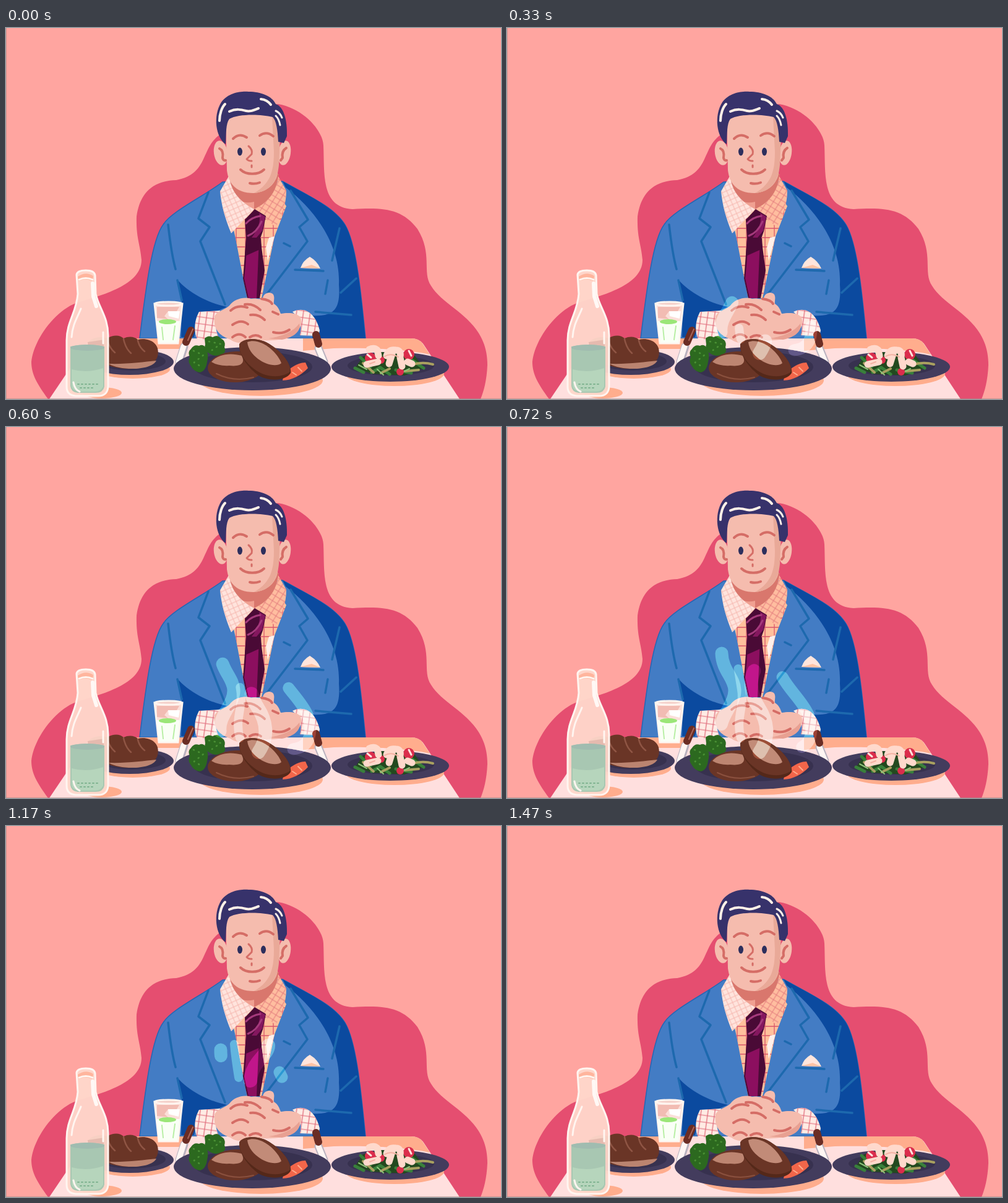
These frames come from a looping animation (800x600 px, 1500 ms). An HTML page:

```html
<!DOCTYPE html>
<html lang="en">
<head>
<meta charset="utf-8">
<title>Dinner</title>
<style>
html, body { margin: 0; width: 100%; height: 100%; overflow: hidden; background: #ffa5a0 }
svg { display: block; width: 800px; height: 600px }
.line { fill: none; stroke-linecap: round; stroke-linejoin: round }
.seam { stroke: #1d69ae; stroke-width: 3.5 }
.crease { stroke: #d56d66; stroke-width: 4 }
.shine { stroke: #fff1e8; stroke-width: 4 }
.glass { stroke: #fff5f0; stroke-width: 3 }
.skin { fill: #f5bcae }
.dark { fill: #0b4a9f }
.plate { fill: #433c5d }
.well { fill: #37314f }
.shadow { fill: #ffad8d }
.meat { fill: #6a3526 }
.steam { stroke: #fff; opacity: .46; mix-blend-mode: overlay }
</style>
</head>
<body>
<svg viewBox="0 0 800 600">
  <defs>
    <pattern id="check" width="15" height="15" patternUnits="userSpaceOnUse" x="371" y="338">
      <path d="M0 1H15M1 0V15" stroke="#d9566a" stroke-width="1.3"/>
    </pattern>
    <pattern id="fineL" width="8" height="8" patternUnits="userSpaceOnUse" patternTransform="rotate(-24)">
      <path d="M0 1H8M1 0V8" stroke="#f5b5ad" stroke-width="1"/>
    </pattern>
    <pattern id="fineR" width="9" height="9" patternUnits="userSpaceOnUse" patternTransform="rotate(32)">
      <path d="M0 1H9M1 0V9" stroke="#e27a7c" stroke-width="1"/>
    </pattern>
    <pattern id="cuff" width="11" height="11" patternUnits="userSpaceOnUse" patternTransform="rotate(8)">
      <path d="M0 1H11M1 0V11" stroke="#de6272" stroke-width="1.2"/>
    </pattern>
  </defs>

  <rect width="800" height="600" fill="#ffa5a0"/>
  <path fill="#e54e70" d="M400 130L440 123C480 130 512 165 513 190C515 235 508 290 560 293C610 290 640 292 665 325C690 365 672 395 687 417C710 455 778 470 778 545C777 570 772 588 767 600H68C50 575 41 560 41 540C44 506 78 458 113 445C155 432 219 416 219 375C217 350 210 340 211 305C218 255 250 247 275 246C328 236 314 195 345 173Z"/>

  <!-- jacket -->
  <path fill="#437cc4" stroke="#2467b5" stroke-width="1.5" d="M350 249C320 272 268 296 254 318C236 342 226 420 216 502H581C574 430 567 358 551 324C536 292 490 272 447 248Z"/>
  <path class="dark" d="M447 248C490 272 536 292 551 324C567 358 574 430 581 502H495V465C530 467 541 455 538 415C541 350 498 292 452 258Z"/>
  <path class="dark" d="M277 407C295 428 325 444 357 451L338 459L312 461L304 500H283L284 440Z"/>

  <!-- shirt -->
  <path fill="#ffc09c" d="M362 300L371 340L384 408L390 437H413L434 337L453 288L440 270Z"/>
  <path fill="url(#check)" d="M362 300L371 340L384 408L390 437H413L434 337L453 288L440 270Z"/>
  <path fill="#fff0ea" d="M425 339L434 337L423 377L420 355Z"/>
  <path fill="#d9776d" d="M358 236H441L433 275L401 294L369 272Z"/>
  <path fill="#f0a091" d="M360 255C370 280 385 285 401 281L401 294L372 282Z"/>
  <path fill="#ffe4dd" d="M361 238C362 262 376 280 401 293L364 332C353 306 348 285 346 264Z"/>
  <path fill="url(#fineL)" d="M361 238C362 262 376 280 401 293L364 332C353 306 348 285 346 264Z"/>
  <path fill="#ffbd9f" d="M440 240C437 265 424 282 401 293L436 322C446 303 453 285 453 263Z"/>
  <path fill="url(#fineR)" d="M440 240C437 265 424 282 401 293L436 322C446 303 453 285 453 263Z"/>

  <!-- tie -->
  <path fill="#4a0a36" d="M402 293L420 304L415 329L411 340L418 392L410 437H390L383 405L388 340L386 310Z"/>
  <path fill="#8c0f5f" d="M389 342L409 341L407 390L405 437H392L385 405C388 380 389 360 389 342Z"/>
  <path fill="#4a0a36" d="M388 340L412 340L413 357L386 369Z"/>
  <path fill="#85175f" d="M409 299L419 305L414 328L405 339H397C408 325 412 312 409 299Z"/>
  <path class="line" stroke="#a53a7c" stroke-width="3" d="M388 316C395 308 404 305 411 304M391 336C402 332 409 322 413 313"/>

  <!-- jacket seams -->
  <g class="line seam">
    <path d="M327 266L311 308L329 322L314 345L354 447M460 263L488 310L474 322L487 345L418 435"/>
    <path d="M262 318C265 345 268 368 274 390M277 408L284 440M539 324L527 376M566 405L541 428M520 408L516 430M500 459L558 464M467 391L513 393M449 348L459 353"/>
  </g>
  <path fill="#ffe5dc" d="M476 388Q480 376 491 370Q503 377 508 389Z"/>
  <path fill="#ffc3a5" d="M476 388L494 383L508 389Z"/>

  <!-- head -->
  <ellipse class="skin" cx="347" cy="202" rx="11" ry="20" transform="rotate(-8 347 202)"/>
  <ellipse class="skin" cx="450" cy="202" rx="10" ry="20" transform="rotate(8 450 202)"/>
  <path class="skin" d="M355 140L357 230C360 255 375 267 400 267C425 265 436 250 439 235L445 140Z"/>
  <path fill="#e9a998" d="M430 143L444 150L441 222C438 250 425 265 401 267C426 252 433 235 433 200Z"/>
  <path class="line crease" d="M345 195Q352 198 350 210Q351 215 355 214M453 194Q445 199 447 210L444 214"/>
  <path fill="#37326b" d="M355 188C339 177 334 142 348 120C360 104 380 102 392 103C412 103 430 110 436 123C449 127 455 150 454 175L449 186L440 184C439 165 437 150 431 144C410 139 375 139 361 147C355 155 356 170 355 188Z"/>
  <g class="line shine">
    <path d="M361 135C372 130 380 132 388 134S402 132 408 130M412 115Q422 116 428 124M345 150C345 139 349 128 354 123"/>
    <path stroke-width="3" d="M436 134Q443 137 446 145M436 142Q441 147 443 157"/>
  </g>
  <g fill="#2d2f5d">
    <ellipse cx="378" cy="200" rx="4" ry="6.5"/>
    <ellipse cx="416" cy="200" rx="4" ry="6.5"/>
  </g>
  <g class="line crease">
    <path d="M367 179Q377 169 389 177M410 174Q421 166 432 175M379 229C388 238 408 238 417 229M394 251Q402 253 410 250"/>
    <path stroke-width="3" d="M392 191Q399 197 397 204L389 212Q391 215 397 215M397 222V225"/>
  </g>

  <!-- table -->
  <path fill="#ffdfde" d="M70 600L124 520Q133 502 155 502H655Q668 502 675 512L733 600Z"/>
  <path class="shadow" d="M480 502H655Q669 502 675 513L685 528C650 520 590 517 530 518L480 522ZM155 502H300L292 519H240L140 516Z"/>
  <ellipse class="shadow" cx="205" cy="552" rx="60" ry="15"/>
  <ellipse class="shadow" cx="412" cy="570" rx="100" ry="25"/>
  <ellipse class="shadow" cx="628" cy="559" rx="80" ry="20"/>
  <ellipse class="shadow" cx="155" cy="590" rx="32" ry="9"/>

  <!-- cuffs and hands -->
  <g fill="#ffebe4">
    <path d="M312 459L346 457C337 474 337 490 346 504L309 503C302 487 306 470 312 459Z"/>
    <path d="M463 459C485 449 501 464 507 489L505 498L475 497C480 480 473 468 463 459Z"/>
  </g>
  <path fill="url(#cuff)" d="M312 459L346 457C337 474 337 490 346 504L309 503C302 487 306 470 312 459ZM463 459C485 449 501 464 507 489L505 498L475 497C480 480 473 468 463 459Z"/>
  <path class="skin" d="M337 466C342 457 354 456 361 449C368 439 384 434 396 438C404 436 410 440 415 437C416 429 426 425 432 431C435 437 432 441 433 446C440 450 442 457 444 462C455 460 470 460 476 468C480 480 473 490 464 497C445 506 425 506 410 505C388 511 371 511 363 504C346 498 334 488 337 466Z"/>
  <path fill="#e8a092" d="M424 502C442 500 464 492 474 478C477 490 466 500 446 504Z"/>
  <g class="line crease">
    <path d="M363 457Q374 447 390 452M386 447Q400 445 411 456M413 438Q427 440 430 446M395 464Q408 462 418 472M366 480Q380 470 391 479M366 500Q377 491 387 500M394 500Q404 494 412 500M431 459L440 463"/>
    <path d="M432 492Q446 496 458 488"/>
  </g>

  <!-- bread -->
  <ellipse class="plate" cx="200" cy="540" rx="71" ry="21"/>
  <ellipse class="well" cx="203" cy="539" rx="55" ry="15"/>
  <path class="meat" d="M133 508C140 500 155 498 163 502C175 495 185 497 190 502C198 498 208 499 213 504C225 501 241 505 245 518C248 531 243 542 225 548C205 553 180 552 164 545L133 540Z"/>
  <path fill="#bb8470" d="M166 543C195 544 222 540 243 538C235 554 186 555 166 543Z"/>
  <path class="line" stroke="#8f5544" stroke-width="2.5" d="M164 504Q166 516 176 525M190 503Q193 518 202 526M213 505Q215 516 224 523"/>

  <!-- glass -->
  <path fill="#fbdfd9" class="glass" d="M240 446L247 510H278L285 446Z"/>
  <ellipse fill="#f5cfc8" class="glass" cx="262.5" cy="446" rx="22" ry="3"/>
  <path fill="#fafff6" d="M243 474L248 509H277L281 474Z"/>
  <path fill="#f2bcb3" d="M244 451H280L276 458H262L256 466L262 471L244 469Z"/>
  <path fill="#fff" d="M262 458H281L279 470L263 466Z"/>
  <ellipse fill="#9be678" cx="261" cy="475" rx="14" ry="4"/>
  <path class="line" stroke="#b9efa6" stroke-width="2" d="M252 484L254 504M273 482L270 504"/>

  <!-- cutlery -->
  <g class="line">
    <path stroke="#b9b2bf" stroke-width="13" d="M288 515L280 540M505 518L514 540"/>
    <path stroke="#fff6f3" stroke-width="9" d="M287 515L279 540M505 518L514 540"/>
    <path stroke="#6b2d24" stroke-width="12" d="M299 489L291 508M501 496L505 511"/>
    <path stroke="#a96558" stroke-width="2" d="M302 487L294 505"/>
  </g>

  <!-- main dish -->
  <ellipse class="plate" cx="398" cy="551" rx="127" ry="35"/>
  <ellipse class="well" cx="399" cy="548" rx="96" ry="25"/>
  <g fill="#2c691f">
    <path d="M299 519Q304 511 312 514Q320 510 324 520Q328 529 325 540Q323 555 313 557Q303 555 299 547Q293 540 297 532Q293 524 299 519Z"/>
    <path d="M321 502Q327 496 334 500Q342 495 347 502Q356 506 353 516Q357 526 347 528Q338 533 328 526Q319 520 322 512Z"/>
  </g>
  <g class="line" stroke="#4b9135" stroke-width="2.5" stroke-dasharray="1 8">
    <path d="M303 522L319 529L304 541L318 549M328 507L347 511L333 521"/>
  </g>
  <path fill="#f2664a" d="M447 570C449 554 470 541 484 541L488 550C478 561 462 570 447 570Z"/>
  <path class="line" stroke="#ffab8b" stroke-width="2" d="M463 557L469 561M472 549L478 555"/>
  <ellipse class="meat" cx="372" cy="548" rx="46" ry="25" transform="rotate(-3 372 548)"/>
  <path fill="#bd8571" d="M332 540C343 527 363 525 381 530C387 542 380 548 361 546Q343 547 332 540Z"/>
  <path class="line" stroke="#8a503e" stroke-width="2" d="M340 559Q368 573 400 565"/>
  <path fill="#542819" d="M377 512C385 500 412 500 430 514C448 526 462 545 460 558C452 571 425 572 408 562C392 550 376 530 377 512Z"/>
  <path class="meat" d="M377 511C385 500 412 500 430 514C448 526 462 545 459 556C448 565 425 566 408 556C392 546 376 530 377 511Z"/>
  <path fill="#c28b78" d="M390 508C409 500 437 521 445 542C432 553 393 535 390 508Z"/>

  <!-- salad -->
  <ellipse class="plate" cx="621" cy="548" rx="95" ry="24"/>
  <ellipse class="well" cx="622" cy="546" rx="70" ry="16"/>
  <path fill="#23491f" d="M565 549L577 531L607 524L660 529L675 550L644 562L590 559Z"/>
  <g class="line">
    <path stroke="#39803b" stroke-width="5" d="M564 550L578 557M573 533L589 548M591 557L605 549L620 560M630 553L655 558M656 537L675 550"/>
    <path stroke="#a9a060" stroke-width="4" d="M577 542L594 557M606 558L620 551M655 545Q672 539 690 544M645 555L667 553"/>
    <path stroke="#8fc27b" stroke-width="2" d="M570 545L583 552M600 552L610 561M638 558L652 551"/>
  </g>
  <g fill="#db2d4c">
    <circle cx="589" cy="534" r="9"/><circle cx="651" cy="528" r="9"/><circle cx="637" cy="556" r="6"/><circle cx="606" cy="537" r="6"/>
  </g>
  <path class="line" stroke="#ffd9cc" stroke-width="11" d="M587 520Q595 516 600 521L602 530M615 530Q619 519 630 521Q639 521 637 532M624 527L619 543M637 533L640 547M601 540L583 544M649 540L656 543"/>
  <path class="line" stroke="#f3b3a4" stroke-width="2" d="M612 531Q622 525 634 532M588 543L596 540"/>
  <path class="line" stroke="#ffe5de" stroke-width="3" d="M651 522L655 530M584 528L590 533"/>

  <!-- bottle -->
  <path fill="#ffd8cc" fill-opacity=".95" class="glass" d="M114 399Q115 392 129 392Q143 392 144 400L145 430C150 453 166 468 165 500V580Q164 595 149 595H113Q98 594 98 580V505C98 475 114 460 116 430Z"/>
  <path fill="#d7a99f" fill-opacity=".55" d="M132 508L158 504V540L133 543Z"/>
  <path fill="#a8c7b2" d="M104 515Q131 509 159 515V580Q157 590 145 590H116Q105 589 104 579Z"/>
  <ellipse fill="#a0bcb0" cx="131.5" cy="517" rx="27.5" ry="5"/>
  <path fill="#b6d5bc" d="M106 552Q131 559 157 550V580Q153 588 144 588H117Q107 586 106 579Z"/>
  <path class="line" stroke="#7fb390" stroke-width="2" stroke-dasharray="2 4" d="M116 576H148M120 582H143"/>
  <path fill="#ffb59d" d="M116 402Q129 393 141 401L140 409Q128 404 117 409Z"/>
  <path class="line glass" d="M118 407Q129 402 140 407M106 500C107 480 116 467 121 454M157 492V510M109 573Q111 585 119 588"/>
  <path class="line" stroke="#fff8f5" stroke-width="6" d="M140 413L141 434L146 450"/>

  <!-- steam -->
  <g class="line">
    <path class="steam" stroke-width="21" pathLength="1" data-t="0 800 600 1280" d="M346 492C343 467 369 449 368 425C367 404 346 393 347 362"/>
    <path class="steam" stroke-width="14" pathLength="1" data-t="150 1000 720 1480" d="M378 503C369 471 384 453 379 425C375 400 371 378 369 353"/>
    <path class="steam" stroke-width="22" pathLength="1" data-t="150 1000 720 1470" d="M408 526C426 500 420 474 407 454C389 426 393 400 406 383C416 370 424 364 424 355"/>
    <path class="steam" stroke-width="19" pathLength="1" data-t="0 830 600 1270" d="M464 521C494 518 496 490 487 465C477 442 452 422 442 398"/>
  </g>

  <path fill="#a98c8a" fill-opacity=".6" d="M0 0H1V599H800V600H0Z"/>
</svg>
<script>
const LOOP = 1500;
const ease = (t, from, to) => {
  const x = Math.min(1, Math.max(0, (t - from) / (to - from)));
  return x * x * (3 - 2 * x);
};
const trails = [...document.querySelectorAll('.steam')].map(path => ({
  path, times: path.dataset.t.split(' ').map(Number)
}));

function draw(now) {
  const t = now % LOOP;
  for (const { path, times: [rise, top, fade, gone] } of trails) {
    const head = ease(t, rise, top), tail = ease(t, fade, gone);
    path.style.display = head - tail > .005 ? '' : 'none';
    path.style.strokeDasharray = `${head - tail} 9`;
    path.style.strokeDashoffset = -tail;
  }
  requestAnimationFrame(draw);
}
draw(0);
</script>
</body>
</html>
```
